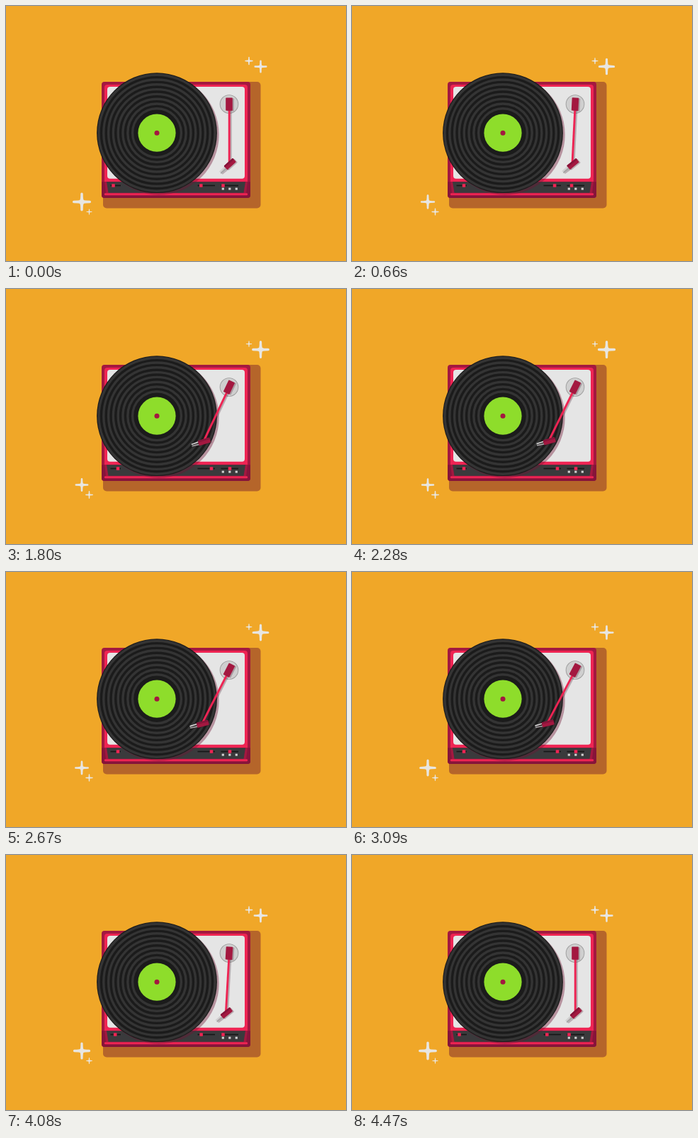
Recreate the animation shown at these times as an HTML page with a canvas. Size 480 px wide and 360 px high, loop 4.5 s.

```html
<!DOCTYPE html>
<html lang="en">
<head>
<meta charset="utf-8">
<title>Turntable</title>
<style>
html, body { margin: 0; width: 100%; height: 100%; overflow: hidden; background: #f0a728; }
canvas { display: block; width: 480px; height: 360px; }
</style>
</head>
<body>
<canvas id="stage" width="480" height="360"></canvas>
<script>
const ctx = document.getElementById('stage').getContext('2d');
const LOOP = 4500;
const TAU = Math.PI * 2;
const COLORS = {
  back: '#f0a728', cast: '#b5652a', crimson: '#a31840', wine: '#86143a',
  red: '#ee2453', plate: '#e5e5e5', panel: '#3a3a3c', ink: '#1b1b1b',
  groove: '#343434', label: '#8edd2b', spark: '#e8e6e1', shade: 'rgba(110,20,50,.4)'
};

function box(x, y, w, h, color, radius = 0) {
  ctx.fillStyle = color;
  ctx.beginPath();
  ctx.roundRect(x, y, w, h, radius);
  ctx.fill();
}

function disc(x, y, r, color) {
  ctx.fillStyle = color;
  ctx.beginPath();
  ctx.arc(x, y, r, 0, TAU);
  ctx.fill();
}

function line(x1, y1, x2, y2, width, color) {
  ctx.strokeStyle = color;
  ctx.lineWidth = width;
  ctx.beginPath();
  ctx.moveTo(x1, y1);
  ctx.lineTo(x2, y2);
  ctx.stroke();
}

// A face that narrows by `inset` on each side towards its bottom edge.
function taper(x, y, w, h, inset, color) {
  ctx.fillStyle = color;
  ctx.beginPath();
  ctx.moveTo(x, y);
  ctx.lineTo(x + w, y);
  ctx.lineTo(x + w - inset, y + h);
  ctx.lineTo(x + inset, y + h);
  ctx.fill();
}

const mix = (a, b, k) => a + (b - a) * k;

function ease(t, start, end) {
  const k = Math.min(1, Math.max(0, (t - start) / (end - start)));
  return k * k * (3 - 2 * k);
}

// Eases on at one moment and off again at a later one.
const hold = (t, on, off, span) => ease(t, on, on + span) - ease(t, off, off + span);

function spark(x, y, r) {
  const tip = r * 0.87;
  ctx.save();
  ctx.translate(x, y);
  ctx.beginPath();
  ctx.moveTo(0, -tip);
  for (const [px, py] of [[tip, 0], [0, tip], [-tip, 0], [0, -tip]]) {
    ctx.bezierCurveTo(0, 0, 0, 0, px, py);
  }
  ctx.closePath();
  ctx.fillStyle = ctx.strokeStyle = COLORS.spark;
  ctx.lineWidth = r * 0.27;
  ctx.lineJoin = 'round';
  ctx.fill();
  ctx.stroke();
  ctx.restore();
}

function sparks(t) {
  const k = (1 - Math.cos(t / 500 * TAU)) / 2;
  spark(107, 276.5, mix(13, 9, k));
  spark(117.5, 290.5, mix(4, 5.5, k));
  spark(343, 77.5, mix(5.7, 4, k));
  spark(359.5, 85.5, mix(9, 12.7, k));
}

function slider(x1, x2, from, to, k) {
  box(x1, 252.7, x2 - x1, 1.6, '#161616');
  box(mix(from, to, k) - 2.3, 251.3, 4.6, 4.4, COLORS.red, 0.6);
}

function deck(t) {
  box(137, 107, 222.5, 178.5, COLORS.cast, 5);
  box(135, 107, 210, 164, COLORS.crimson, 4);
  box(139, 111, 202, 137.3, COLORS.red, [4, 4, 0, 0]);
  box(143, 114, 194, 129.7, COLORS.plate, 4);
  box(135, 248.3, 210, 22.7, COLORS.wine, [0, 0, 4, 4]);
  taper(139, 248.3, 202, 16, 2, COLORS.crimson);
  box(139, 264.2, 202, 3, COLORS.red, 1);
  taper(142, 248.3, 196, 15.4, 2.5, COLORS.panel);
  slider(147.5, 162, 151.5, 158, hold(t, 100, 3780, 540));
  slider(270.5, 295, 275.3, 290, hold(t, 290, 3570, 560));
  slider(303.5, 328, 306.5, 316, hold(t, 430, 3450, 560));
  for (const x of [306.3, 315.8, 325.3]) box(x - 1.6, 256.6, 3.2, 3, '#d2d2d2');
}

function record() {
  const x = 213, y = 179.2;
  disc(x + 2.7, y + 2.5, 85, COLORS.shade);
  disc(x, y, 84.9, COLORS.ink);
  ctx.strokeStyle = COLORS.groove;
  ctx.lineWidth = 3.4;
  for (let r = 34.4; r < 83; r += 6.8) {
    ctx.beginPath();
    ctx.arc(x, y, r, 0, TAU);
    ctx.stroke();
  }
  disc(x, y, 26.6, COLORS.label);
  disc(x, y, 3.5, COLORS.crimson);
}

function armShape(shadow) {
  const pick = color => shadow ? 'rgba(70,20,40,.28)' : color;
  line(0.2, 8, 0.2, 82, 2.9, pick(COLORS.red));
  box(-4.8, -9, 9.6, 18.3, pick(COLORS.crimson), 1);
  ctx.save();
  ctx.translate(1.2, 84.5);
  ctx.rotate(0.84);
  line(-1.8, 7, -1.2, 18.5, 1.7, pick('#d0d0d0'));
  line(1.8, 7, 1.2, 18.5, 1.7, pick('#a4a4a4'));
  box(-3.6, -8.5, 7.2, 17, pick(COLORS.crimson), 1);
  if (!shadow) box(-3.6, -8.5, 2.6, 17, COLORS.wine, 1);
  ctx.restore();
}

function armAngle(t) {
  const drift = 24.3 + 1.9 * (Math.min(t, 3450) - 1250) / 1000;
  const angle = t < 1250 ? 24.3 * ease(t, 500, 1250) : drift * (1 - ease(t, 3450, 4250));
  return angle * Math.PI / 180;
}

function arm(t) {
  const x = 315, y = 138.5;
  disc(x, y, 13.3, '#9c9c9c');
  disc(x, y, 12.4, '#cfcfcf');
  for (const shadow of [true, false]) {
    ctx.save();
    ctx.translate(x + (shadow ? 2 : 0), y + (shadow ? 0.8 : 0));
    ctx.rotate(armAngle(t));
    armShape(shadow);
    ctx.restore();
  }
}

function draw(t) {
  box(0, 0, 480, 360, COLORS.back);
  deck(t);
  record();
  arm(t);
  sparks(t);
}

const begin = performance.now();
function tick() {
  draw((performance.now() - begin) % LOOP);
  requestAnimationFrame(tick);
}
tick();
</script>
</body>
</html>
```
